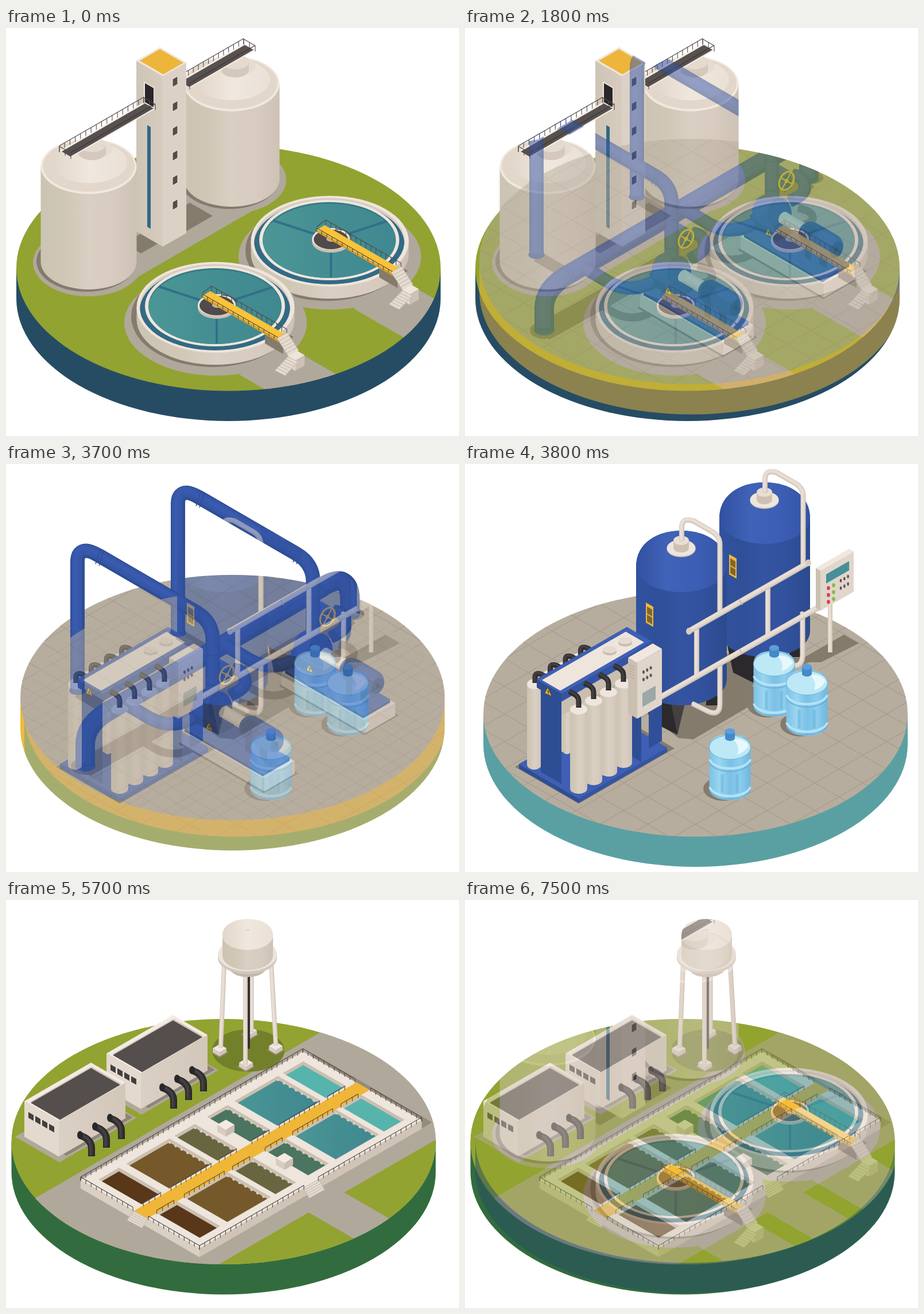
An HTML page for the animation above (7600 ms loop, 789 by 710 pixels).

```html
<!DOCTYPE html>
<html lang="en">
<head>
<meta charset="utf-8">
<title>Water treatment</title>
<style>
html, body { margin: 0; width: 100%; height: 100%; overflow: hidden; background: #fff; }
svg { display: block; width: 100%; height: 100%; }
.scene, .blend { visibility: hidden; animation: 7.6s step-end infinite; animation-delay: calc(var(--i) * 1.9s - 7.6s); }
.scene { animation-name: show; }
.blend { animation-name: mix; opacity: .5; }
@keyframes show { 0% { visibility: visible } 25%, 100% { visibility: hidden } }
@keyframes mix { 0% { visibility: hidden } 23.684% { visibility: visible } 25%, 100% { visibility: hidden } }
</style>
</head>
<body>
<svg id="stage" viewBox="0 0 789 710"></svg>
<script>
const K = .577; // isometric slope
const cream = '#eee5dc', stone = '#d8ccc0', ink = '#504b4a', shade = '#857b6d', pave = '#b1a89c';
const grass = '#92a331', floor = '#b7ad9e', gold = '#f0b83a', blue = '#3656a7', navy = '#2e4e94', sky = '#3e5fb5';
const plaster = [cream, '#cbc2b2', '#dfd4c8'], steel = [sky, navy, '#3454a3'];
const rubber = ['#282628', '#353335', '#444244'];

const P = (d, f, x = '') => `<path d="${d}" fill="${f}" ${x}/>`;
const G = (pts, f) => `<polygon points="${pts}" fill="${f}"/>`;
const E = (cx, cy, rx, ry, f, x = '') => `<ellipse cx="${cx}" cy="${cy}" rx="${rx}" ry="${ry}" fill="${f}" ${x}/>`;
const L = (d, c, w, x = '') => `<path d="${d}" fill="none" stroke="${c}" stroke-width="${w}" ${x}/>`;
const at = (x, y, s) => `<g transform="translate(${x} ${y})">${s}</g>`;
const times = (n, f) => Array.from({ length: n }, (_, i) => f(i)).join('');
// n copies going up and right, the far one first
const row = (n, dx, s) => times(n, i => at((n - 1 - i) * dx, -(n - 1 - i) * dx * K, s));

// Solids: a runs right and up, b runs right and down
const rhomb = (x, y, a, b, f) => P(`M${x} ${y}l${a} ${-K * a}l${b} ${K * b}l${-a} ${K * a}z`, f);
const face = (x, y, w, h, f, dir = 1, more = '') => P(`M${x} ${y}l${w} ${dir * K * w}v${h}l${-w} ${-dir * K * w}z`, f, more);
const box = (x, y, a, b, h, [top, left, right] = plaster) =>
  face(x, y, b, h, left) + face(x + b, y + K * b, a, h, right, -1) + rhomb(x, y, a, b, top);
const drum = (x, y, rx, ry, h, side, top) =>
  P(`M${x - rx} ${y}v${h}a${rx} ${ry} 0 0 0 ${2 * rx} 0v${-h}z`, side) + E(x, y, rx, ry, top);
const tube = (d, w, [dark, mid, light] = [navy, blue, '#3a5ab0']) =>
  L(d, dark, w) + at(-w * .06, -w * .09, L(d, mid, w * .74)) + at(-w * .12, -w * .18, L(d, light, w * .3));
const pale = (d, w = 9) => tube(d, w, ['#cfc3b7', '#e3d8cd', '#eae0d6']);
const rail = (x, y, dx, dy, h = 7) => {
  const n = Math.max(2, Math.round(dx / 9));
  return L(`M${x} ${y - h}l${dx} ${dy}` + times(n + 1, i => `M${x + dx * i / n} ${y + dy * i / n}v${-h}`), ink, 1.1);
};
const flight = (x, y, wx, wy, dx, dy, n) => times(n, i =>
  P(`M${x + dx * i} ${y + dy * i}l${wx} ${wy}l${dx} ${dy}l${-wx} ${-wy}z`, '#e5dbd0', 'stroke="#beb2a5" stroke-width=".8"'));
const warn = (x, y) => P(`M${x - 6} ${y + 2}l5 -10l7 15z`, gold, 'stroke="#5d5030"') +
  L(`M${x - .6} ${y - 3}l.8 5m.2 1.5v1.5`, '#3a3430', 1.6);

let clips = 0;
const clip = (shape, s) => {
  const id = 'c' + clips++;
  return `<clipPath id="${id}">${shape}</clipPath><g clip-path="url(#${id})">${s}</g>`;
};
const disc = (cx, cy, rim, top, s) =>
  drum(cx, cy, 369.5, 213.5, 52.5, rim, top) + clip(E(cx, cy, 369.5, 213.5, top), s);
const tiles = (cx, cy) => times(27, i => {
  const y = cy + (i - 13) * 48;
  return L(`M${cx - 370} ${y - 213.5}l740 427M${cx - 370} ${y + 213.5}l740 -427`, '#a89d8f', 1.4);
});

// Silos and clarifiers
function clarifier() {
  const spokes = times(3, i => {
    const t = Math.PI * (.5 + i * 2 / 3);
    return L(`M566 368L${566 + 116 * Math.cos(t)} ${368 + 66 * Math.sin(t)}`, '#32708a', 4);
  });
  return drum(564, 371, 137.5, 79, 21, 'url(#cream)', cream) + E(563, 371, 131, 75, stone) +
    clip(E(563, 371, 131, 75, stone), E(563, 376, 131, 75, '#326a84')) +
    E(563, 369, 122, 70, cream) + E(563, 369, 116, 66, '#357b86') +
    clip(E(563, 369, 116, 66, cream), E(563, 372, 116, 66, 'url(#water)') + spokes) +
    drum(566, 367, 33, 19, 5, '#cbbfb3', cream) + E(566, 368, 30, 17, ink) + E(567, 367, 9, 5, '#bfb5ac') +
    L('M574 350q22 0 26 12', ink, 1.5) + face(650, 412, 32, 22, shade) +
    rail(557, 343, 131, 75, 9) + box(541, 351, 14, 134, 4, ['#fac338', '#d9a02d', '#e8dccf']) +
    rail(541, 354, 134, 77, 6) + L('M541 346l16 -12', ink, 1.1) +
    flight(671, 425, 18, -10, 3.3, 5.2, 6) + box(690, 456, 16, 13, 18, [cream, '#e2d7cb', '#cdc1b5']) +
    flight(690, 457, 18, 9, -3.8, 4, 6);
}
function silo() {
  return drum(144, 241, 83.5, 48, 166, 'url(#cream)', '#f1e8df') + E(144, 240, 80, 45, '#e3d7cb') +
    E(145, 234, 66, 36, 'url(#dome)') + E(150, 210, 36, 17, '#e8dcd1') + drum(150, 203, 24, 13, 14, '#d5c8bc', '#e5dace');
}
function deck(x, y, a) {
  const end = y - a * K;
  return rail(x, y + 2, a, -a * K, 11) + rhomb(x, y, a, 20, '#f5ece3') + rhomb(x + 4, y + 1, a - 2, 15, '#56504f') +
    rail(x, y + 2, 20, 20 * K, 10) + rail(x + a, end + 2, 20, 20 * K, 10) +
    L(`M${x + 20} ${y + 3}l${a} ${-a * K}`, '#3b3635', 1.2);
}
function plant() {
  const pad = E(564, 398, 159, 92, pave) + rhomb(605, 488, 85, 170, pave) + E(559, 387, 142, 88, shade) +
    rhomb(630, 440, 50, 20, shade);
  const ground = E(143, 408, 96, 59, pave) + E(140, 406, 87, 53, shade);
  const tower = box(227, 57, 41, 46, 297, [cream, 'url(#wall)', '#dcd1c5']) + rhomb(233, 57, 35, 41, '#edb539') +
    face(246, 169, 6, 177, '#316985') + face(240, 93, 18, 36, '#f3eae1') + face(242, 96, 15, 33, '#29262a') +
    times(6, i => face(290, 89 + i * 42.8, 9, 14, '#574c48', -1, 'stroke="#f2e9e0"'));
  return disc(387.5, 418, '#264c64', grass,
    rhomb(120, 381, 220, 100, pave) + at(249, -144, ground) + ground +
    rhomb(205, 375, 45, 30, shade) + rhomb(275, 330, 45, 40, shade) + pad + at(-199, 115, pad)) +
    at(249, -144, silo()) + deck(300, 93, 114) + tower + silo() + deck(93, 214, 147) +
    clarifier() + at(-199, 115, clarifier());
}

// Pumps
function pump() {
  const run = 'M299.5 295V68Q300 50 315 50Q322 50 338 59L507 157Q535 174 535 205V305';
  const collar = (x, y) => L(`M${x} ${y}l8 -25m6 3l-8 25`, navy, 1.5);
  const bolts = times(9, i => E(548 + 18 * Math.cos(i * .7), 324 + 25 * Math.sin(i * .7), 1.5, 2, '#274582'));
  const wheel = E(0, 0, 11.5, 17, 'none', `stroke="${gold}" stroke-width="3"`) + L('M0 -16V16M-11 0H11', gold, 2.2) + E(0, 0, 3, 4, gold);
  const motor = face(592, 375, 11, 24, navy) + face(617, 390, 13, 21, navy) +
    L('M602 358l16 9', navy, 42, 'stroke-linecap="round"') +
    times(7, i => L(`M${586 + i * 4} ${365 + i * 2.4}q2 -18 15 -21`, '#24407c', 2)) +
    L('M623 370l15 9', blue, 42, 'stroke-linecap="round"') + L('M622 360l18 10', sky, 16, 'stroke-linecap="round"') +
    E(647, 386, 10, 15, '#29488a', 'transform="rotate(25 647 386)"') + E(647, 386, 3, 5, '#203b74');
  return drum(299.5, 293, 14, 7, 1, navy, navy) + tube(run, 25) + collar(331, 73) + collar(500, 171) +
    L('M522 229q13 8 26 0m-26 37q13 8 26 0', navy, 1.5) +
    rhomb(475, 386, 60, 149, shade) + box(480, 363, 53, 145, 22) + box(486, 358, 47, 136, 6, steel) +
    tube('M572 256Q592 258 592 279Q591 291 566 301', 22) +
    tube('M381 315L425 341Q466 365 515 334', 23) + L('M501 323l15 24', navy, 13) +
    box(537, 246, 12, 20, 28, [sky, blue, navy]) +
    E(530, 322, 30, 33, blue) + E(520, 315, 17, 23, '#3a5aaf') +
    box(504, 334, 28, 40, 15, [blue, navy, navy]) + E(548, 324, 21, 29, '#3151a0') + bolts +
    L('M566 291l9 17', navy, 13) + tube('M535 285V242', 25) +
    `<g transform="translate(560 266) rotate(28)">${wheel}</g>` +
    pale('M553 329L593 352', 22) + E(554, 330, 7, 11, '#e2d8cd', 'transform="rotate(30 554 330)"') + motor + warn(529, 357);
}
function pumps() {
  const shadow = L('M400 372L430 392Q468 415 505 390M580 313Q612 320 604 336Q594 346 570 342', shade, 14) +
    L('M300 296l50 29', shade, 20);
  const both = s => s + at(-175, 101, s);
  const mains = 'M138 526V488Q138 452 182 428L548 216Q570 201 584 204Q599 210 599 235V264';
  const seam = 'q14 9 18 27';
  return disc(394.5, 406.5, '#efb93b', floor, tiles(394.5, 406.5) + L('M138 528L235 474L600 263', shade, 34) +
    both(shadow) + E(138, 526, 25, 15, shade) + E(602, 261, 22, 11, shade)) +
    E(138, 525, 18, 10, '#3454a0') + E(599, 263, 17, 8, navy) +
    tube('M299.5 295V68', 25) + tube(mains, 34) +
    L(`M170 417${seam}M176 414${seam}M540 203${seam}`, navy, 2) + both(pump());
}

// Filter tanks, membrane rack, bottles
function tank() {
  return G('312,400 380,418 370,471 322,447', '#2b292b') + G('358,412 383,417 370,471', '#444041') +
    face(420, 400, 22, 20, '#2b292b', 0) +
    P('M298 180C298 137 335 116 377 116S456 137 456 180V375A79 45 0 0 1 298 375z', 'url(#tank)') +
    P('M298 178C298 137 335 116 377 116S456 137 456 178A79 45 0 0 1 298 178z', 'url(#cap)') +
    drum(376.5, 146, 25, 14, 2, '#d4c8bc', cream) + drum(376.5, 133, 13.5, 8, 13, '#cdc1b4', '#e8ded4') +
    pale('M377.5 134V112Q377 92 398 99L431 118Q444 126 444 140V262') +
    face(315, 241, 13, 35, gold) + [248, 262].map(y => face(317, y, 9, 12, '#806631')).join('');
}
function bottle() {
  const ring = y => L(`M426 ${y}a36 19 0 0 0 71 0`, '#b5e3f5', 4) + L(`M426 ${y + 5}a36 19 0 0 0 71 0`, '#5fa9d7', 1.2);
  return P('M425.5 492C425.5 476 443 470 461 470S497.5 476 497.5 492V566A36 19 0 0 1 425.5 566z', 'url(#bottle)') +
    E(461.5, 493, 36, 21, '#bde8f6', 'stroke="#6bb2dc"') + P('M466 478q24 0 28 13q-10 13 -20 14q6 -14 -8 -27z', '#e9f8fc') +
    ring(514) + ring(562) + L('M448 540v32m26 -32v32', '#68b0dc', 5, 'opacity=".5"') +
    drum(461.5, 465, 8.5, 5, 12, '#4589c9', '#5a9fdc');
}
const keys = (x, y, f) => times(6, i => f(x + i % 3 * 6.3, y + (i > 2) * 13 - i % 3 * 3.6));
function rack() {
  const bar = (x, y, w, h) => drum(x + w / 2, y, w / 2, 9, h, 'url(#cream)', cream);
  const back = bar(108, 383, 25, 140) + tube('M122 381V371Q122 362 133 366L142 371', 9, rubber);
  const front = bar(183, 427, 30, 138) + tube('M182 396L191 401Q198 405 198 413V424', 9, rubber);
  return rhomb(87, 527, 167, 111, shade) + box(94, 522, 154, 104, 8, steel) + row(4, 26.5, back) +
    face(289, 410, 18, 98, navy) + face(320, 407, 23, 88, '#314f98', -1) +
    bar(169, 400, 17, 96) + face(168, 414, 130, 24, '#c9beb0', -1) +
    face(132, 390, 36, 146, navy) + box(125, 374, 157, 43, 15, steel) + rhomb(134, 376, 146, 32, cream) +
    [0, 27].map(d => drum(252 + d, 323 - d * K, 12, 6, 4, '#c9bdb0', '#e6dbd0')).join('') +
    warn(145, 397) + row(4, 26, front) +
    box(284, 337, 43, 16, 97, ['#f0e7de', '#cabfb1', '#e0d5ca']) +
    times(5, i => L(`M286 ${349 + i * 5}l9 5`, '#aea398', 1)) +
    keys(311, 362, (x, y) => E(x, y, 2, 3, '#5b5553')) + face(309, 399, 23, 24, '#9ba8a5', -1);
}
function filters() {
  const lamps = times(3, i => E(633, 216 + i * 12, 2.8, 3.4, '#d33f50') + E(642, 211 + i * 12, 2.8, 3.4, '#85b84b'));
  const panel = pale('M636 240V328', 8) + box(611, 181, 58, 8, 70, ['#f0e7de', '#cbc0b4', '#e1d6cb']) +
    face(629, 192, 40, 16, '#488f99', -1) + lamps + keys(654.5, 203, (x, y) => E(x, y, 1.8, 3, '#5b5553'));
  const spread = s => at(77, -145, s) + at(134, -112, s) + s;
  return disc(401.5, 435, '#5aa0a2', floor, tiles(401.5, 435) +
    G('318,435 372,477 398,479 520,407 500,385 600,345 620,345 686,312 660,297 590,337 450,330', shade) +
    spread(E(450, 565, 35, 21, shade))) +
    at(145, -84, tank()) + tank() +
    pale('M444 345V418Q444 439 424 431L396 417M588 258V332Q588 351 574 351M403.5 285V368M527.5 212V298') +
    pale('M390 291L598 172M335 409L620 247', 10) + E(390, 291, 5, 6, '#d9cdc1') + E(598, 172, 5, 6, '#d9cdc1') +
    L('M478 236l5 9M478 322l5 9', '#c6baae', 2) + panel + rack() + spread(bottle());
}

// Settling pools and water tower
const iso = (u, v) => [130 + 387 * u + 207 * v, 487 - K * 387 * u + K * 207 * v];
const fence = (u, v, u2, v2) => {
  const [x, y] = iso(u, v), [x2, y2] = iso(u2, v2);
  return rail(x, y + 2, x2 - x, y2 - y);
};
const slab = (u, v, du, dv, f) => rhomb(...iso(u, v), 387 * du, 207 * dv, f);
function pit(u, du, v, f, wide) {
  const far = iso(u + du, v), near = iso(u + du, v + .335);
  return slab(u, v - .027, du + .015, .364, '#cbbfb1') + slab(u, v, du, .335, f) +
    (wide ? L(`M${far}L${near}`, stone, 4, 'stroke-dasharray="1 11" stroke-linecap="round"') : '');
}
function pools() {
  const colors = ['#583819', '#75592a', '#686640', '#4b7560', 'url(#water)', '#56b4ad'];
  // each half holds a narrow, a wide and a narrow pool
  const span = i => [[.042, .166, .383][i % 3] + (i > 2 ? .488 : 0), i % 3 === 1 ? .18 : .077];
  const all = f => times(6, i => f(...span(i), i));
  const crate = box(368, 391, 15, 15, 12, ['#f3ebe3', '#d8ccc0', '#cbbfb2']);
  return slab(-.015, .06, 1.03, 1, '#958b7d') + box(...iso(0, 0), 387, 207, 15, [cream, '#dacfc3', '#d0c4b7']) +
    all((u, du, i) => pit(u, du, .1, colors[i], i % 5) + pit(u, du, .588, colors[i], i % 5)) +
    slab(0, .45, 1, .112, '#f0b637') +
    flight(221, 541, 26, 14, -2, 3.2, 5) + flight(518, 501, 27, -15, 2, 3.6, 5) +
    fence(0, 0, 1, 0) + [0, 1].map(u => fence(u, 0, u, .44) + fence(u, .57, u, 1)).join('') +
    fence(0, 1, .47, 1) + fence(.535, 1, 1, 1) +
    all((u, du) => fence(u, .45, u + du, .45) + fence(u, .562, u + du, .562)) +
    crate + at(102, 58, crate);
}
function building() {
  const elbow = tube('M128 409L137 413Q149 420 149 432V446', 12, rubber) + E(129, 409, 5, 7, '#29272a');
  return rhomb(16, 412, 134, 77, pave) + rhomb(70, 425, 116, 35, '#8f867a') +
    box(32, 350, 116, 60, 62, ['#f3ebe3', '#e4d9ce', 'url(#wall2)']) + rhomb(43, 351, 106, 52, '#d2c6ba') +
    rhomb(43, 353, 105, 51, '#544e4d') + times(4, i => face(39 + i * 12, 369 + i * 6.8, 9, 10, '#433e3e')) + row(3, 26, elbow);
}
function waterTower() {
  const foot = (x, y) => rhomb(x - 16, y + 3, 16, 16, '#928b70') + box(x - 12, y - 4, 12, 12, 7, ['#f1e9e1', '#d9cdc1', '#cfc3b7']);
  return E(422, 262, 63, 37, '#73802a') + foot(425, 231) + foot(372, 262) + foot(470, 258) + foot(418, 287) +
    pale('M428 130V230', 7) + L('M422 133V259', '#333033', 6) +
    pale('M380 112L374 257M462 112L470 253M417 125V287', 8) +
    P('M385 110Q390 134 421 134T458 110z', '#c3b8ab') + drum(420.5, 95, 51.5, 29, 5, '#d3c7bb', '#eee4da') +
    drum(421, 62, 44, 25, 35, 'url(#cream)', cream) +
    P('M377 61C377 44 396 33 421 33S465 44 465 61A44 25 0 0 1 377 61z', 'url(#dome)') + E(421, 52, 3, 1.5, '#dfd3c8');
}
function station() {
  return disc(379, 420.5, '#326c3e', grass,
    G('30,531 560,223 800,300 800,700 0,700', pave) + rhomb(589, 509, 200, 78, grass) + rhomb(258, 699, 269, 79, grass)) +
    at(143, -83, building()) + building() + waterTower() + pools();
}

const grad = (id, ...colors) => `<linearGradient id="${id}">` +
  colors.map((c, i) => `<stop offset="${i / (colors.length - 1)}" stop-color="${c}"/>`).join('') + '</linearGradient>';
const defs = grad('cream', '#ccc4b2', '#d0c7b6', '#dacfc3', '#d8cbbf', '#cec1b5') + grad('wall', '#cfc5b6', '#d6cbbe') +
  grad('wall2', '#dbd0c4', '#d3c7ba') + grad('dome', '#e2d6ca', '#f0e7de', '#eae0d6') +
  grad('water', '#4b9695', '#448e92', '#3f8890') + grad('tank', '#31529f', '#2f4f98', '#3454a2', '#31519c', '#2c4a8e') +
  grad('cap', '#3151a0', '#4062b7', '#3c5eb4', '#3454a3') + grad('bottle', '#7dc1e5', '#9ad6f0', '#7cc0e5', '#8bcdec', '#6fb5df');
const scenes = [plant(), pumps(), filters(), station()];

// The next scene fades in only where the current one is painted
stage.innerHTML = `<defs>${defs}${scenes.map((s, i) => `<g id="s${i}">${s}</g>` +
  `<mask id="m${i}" maskUnits="userSpaceOnUse" x="0" y="0" width="789" height="710" style="mask-type:alpha"><use href="#s${i}"/></mask>`).join('')}</defs>` +
  scenes.map((_, i) => `<g class="scene" style="--i:${i}"><use href="#s${i}"/></g>` +
    `<g class="blend" style="--i:${i}" mask="url(#m${i})"><use href="#s${(i + 1) % 4}"/></g>`).join('');
</script>
</body>
</html>
```
